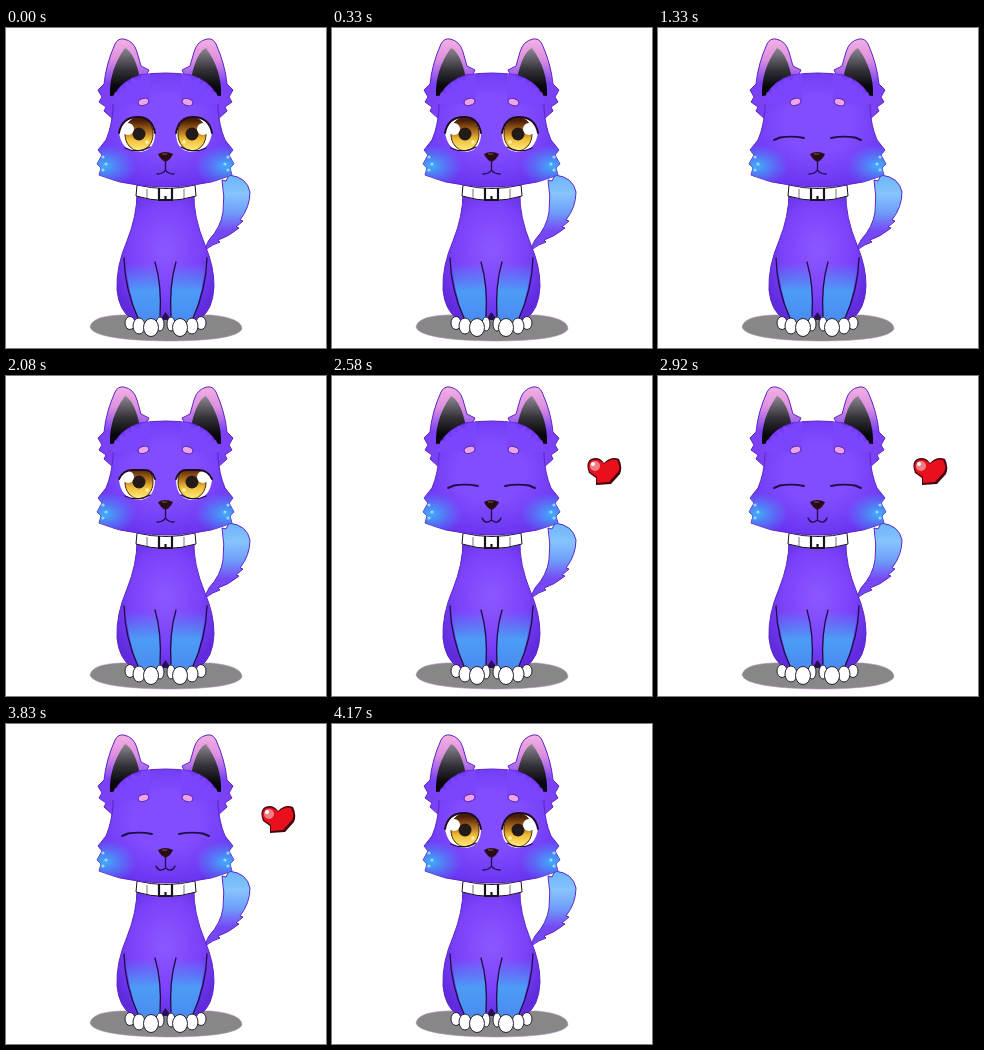
Write an HTML page that moves like this. It is 320x320 px and loops after 4260 ms.

```html
<!DOCTYPE html>
<html lang="en">
<head>
<meta charset="utf-8">
<title>Blinking cat</title>
<style>
html, body { margin: 0; height: 100%; overflow: hidden; background: #fff; }
svg { display: block; width: 100vw; height: 100vh; }
.line { fill: none; stroke: #1f0d48; stroke-width: 1.3; stroke-linecap: round; stroke-linejoin: round; }
.fur { stroke: #5b25c9; stroke-width: 1; stroke-linejoin: round; }
</style>
</head>
<body>
<svg viewBox="0 0 320 320">
  <defs>
    <radialGradient id="head" cx=".5" cy=".45" r=".62">
      <stop offset=".4" stop-color="#824dff"/><stop offset="1" stop-color="#6730ee"/>
    </radialGradient>
    <radialGradient id="body" cx=".5" cy=".45" r=".6">
      <stop offset=".1" stop-color="#8a54ff"/><stop offset=".6" stop-color="#7b42fa"/><stop offset="1" stop-color="#602bdd"/>
    </radialGradient>
    <linearGradient id="leg" x2="0" y2="1">
      <stop offset=".1" stop-color="#4a9cf6" stop-opacity="0"/>
      <stop offset=".55" stop-color="#4c9cf6"/><stop offset="1" stop-color="#4a8cf0"/>
    </linearGradient>
    <radialGradient id="cheek">
      <stop offset=".1" stop-color="#45a2f8"/><stop offset="1" stop-color="#4a90f8" stop-opacity="0"/>
    </radialGradient>
    <linearGradient id="tail" x2="0" y2="1">
      <stop stop-color="#6cb4fa"/><stop offset=".25" stop-color="#86c4fc"/>
      <stop offset=".5" stop-color="#6f9dfa"/><stop offset=".75" stop-color="#7648f4"/>
    </linearGradient>
    <linearGradient id="inner" x2="0" y2="1">
      <stop stop-color="#8d8792"/><stop offset=".45" stop-color="#35333a"/><stop offset=".8" stop-color="#08070a"/>
    </linearGradient>
    <linearGradient id="earFur" x2="0" y2="1">
      <stop stop-color="#f2b0e2"/><stop offset=".25" stop-color="#dd90df"/><stop offset=".55" stop-color="#7a42f4"/>
    </linearGradient>
    <linearGradient id="iris" x2="0" y2="1">
      <stop offset=".1" stop-color="#4b1c08"/><stop offset=".4" stop-color="#a9691b"/>
      <stop offset=".65" stop-color="#efbd35"/><stop offset="1" stop-color="#ffee80"/>
    </linearGradient>
    <path id="headShape" d="M107 80Q105 57 134 47Q160 43 185 47Q214 57 212 80Q213 98 219 112L227 122L223 127L228 136L224 140L226 147Q212 152 205 154Q182 159 160 159Q137 159 114 154Q107 152 93 147L95 140L91 136L96 127L92 122L100 112Q106 98 107 80Z"/>
    <clipPath id="face"><use href="#headShape"/></clipPath>
    <clipPath id="opening"><path id="lidShape"/></clipPath>

    <g id="ear">
      <path class="fur" fill="url(#earFur)" d="M108 92L98 83L100 79L93 74L96 69L92 62L98 56Q100 36 109 16Q112 10 118 11Q128 13 131 24L135 38L143 42L139 50L130 70Z"/>
      <path fill="url(#inner)" d="M104 68Q103 42 119 20Q129 25 134 51L124 66Z"/>
    </g>
    <path id="tuft" fill="#7c45fb" d="M105 76L109 64L114 67L114 59L120 62L119 54L126 57L125 50L133 53L136 47L144 46V76Z"/>
    <g id="eye">
      <g clip-path="url(#opening)">
        <path fill="#fff" d="M110 82H154V126H110Z"/>
        <ellipse cx="133" cy="106" rx="14" ry="17" fill="url(#iris)" stroke="#4a2209"/>
        <circle cx="133" cy="106" r="6.500" fill="#241b18"/>
        <circle cx="122" cy="101" r="6" fill="#fff"/>
        <circle cx="141" cy="114" r="1.800" fill="#fff4b8"/>
      </g>
      <path id="lid" fill="none" stroke="#1c0c20" stroke-width="1.900" stroke-linecap="round"/>
      <path class="line" d="M119 120Q131 126 144 119" stroke-width=".8"/>
    </g>
    <path id="shut" class="line" style="stroke-width:1.900" d="M116 112L122 109.500Q134 107.500 146 110"/>
    <g id="foreleg">
      <path fill="url(#leg)" d="M119 232Q135 224 149 234Q155 258 154 292H132Q122 262 119 232Z"/>
      <path class="line" d="M118 230Q119 262 132 290M149 234Q156 258 154 288"/>
      <g fill="#fff" stroke="#292136">
        <ellipse cx="124" cy="295" rx="5" ry="6.500"/><ellipse cx="154" cy="296" rx="4" ry="7"/>
        <ellipse cx="133" cy="298" rx="6" ry="8"/><ellipse cx="145" cy="299.500" rx="7.500" ry="9"/>
      </g>
    </g>
    <g id="whiskerDots" fill="#8fdaff">
      <circle cx="97" cy="129" r="1.600"/><circle cx="100" cy="136" r="1.600"/><circle cx="97" cy="142" r="1.600"/>
    </g>
  </defs>

  <path fill="#878787" stroke="#b08ab8" stroke-width=".6" d="M84 299Q86 288 115 287H205Q236 290 236 301Q230 313 160 313Q88 312 84 299Z"/>
  <path class="fur" fill="url(#tail)" d="M198 222L203 212Q215 199 217 184Q219 168 216 152L220 153L223 147Q241 149 244 164Q244 179 234 192L237 193L230 199L233 200Q222 209 212 212L214 214Q207 216 199 222Z"/>
  <path class="fur" fill="url(#body)" d="M131 165Q131 188 121 213Q110 238 111 262Q113 283 126 291H193Q207 283 208 258Q208 238 199 217Q187 188 188 165Z"/>
  <path fill="#241150" d="M154 292L159.500 284L165 292Z"/>
  <use href="#foreleg"/><use href="#foreleg" transform="matrix(-1 0 0 1 319 0)"/>

  <g stroke="#17141d" fill="none">
    <path fill="#fff" d="M131 157Q160 164 189 157L190 168Q160 177 130 168Z"/>
    <path stroke="#77727e" d="M141 161V170M178 161V170"/>
    <path stroke-width="2.200" d="M153 160V172H166V160M159.500 172V168"/>
  </g>

  <use href="#ear"/><use href="#ear" transform="matrix(-1 0 0 1 319 0)"/>
  <use href="#headShape" class="fur" fill="url(#head)"/>
  <use href="#tuft"/><use href="#tuft" transform="matrix(-1 0 0 1 319 0)"/>
  <g fill="url(#cheek)" clip-path="url(#face)">
    <ellipse cx="99" cy="138" rx="32" ry="22"/><ellipse cx="220" cy="138" rx="32" ry="22"/>
  </g>
  <use href="#whiskerDots"/><use href="#whiskerDots" transform="matrix(-1 0 0 1 319 0)"/>
  <g fill="#eda4e6" stroke="#5629af">
    <ellipse cx="137.500" cy="74" rx="5.500" ry="3.500" transform="rotate(-15 137 74)"/>
    <ellipse cx="181.500" cy="74" rx="5.500" ry="3.500" transform="rotate(15 181 74)"/>
  </g>
  <g id="openEyes"><use href="#eye"/><use href="#eye" transform="matrix(-1 0 0 1 319 0)"/></g>
  <g id="shutEyes"><use href="#shut"/><use href="#shut" transform="matrix(-1 0 0 1 319 0)"/></g>
  <path fill="#2a0d12" d="M152 126Q159 122 167 126Q165 131 159.500 134Q154 131 152 126Z"/>
  <path fill="none" stroke="#875058" d="M156 126H161"/>
  <path id="mouth" class="line"/>

  <g id="heart">
    <path fill="#430711" d="M264 109V102L257 97Q253 87 259 83Q267 80 272 87Q279 80 287 83Q291 91 288 98L279 108Z"/>
    <path fill="#e90f1d" d="M265 107V101L258 96Q254 88 260 84Q267 82 272 88Q279 82 285 84Q289 91 286 96L277 106Z"/>
    <circle cx="263" cy="90" r="5" fill="#ee8088"/>
    <circle cx="261" cy="88" r="2" fill="#fff"/>
  </g>
</svg>
<script>
const LOOP = 4260, FPS = 12, ROUNDING = 8;
const HAPPY_START = 31, HAPPY_END = 50;
const blinkStarts = [1, 11, 15, 25];
const get = id => document.getElementById(id);
const show = (id, on) => get(id).style.display = on ? "" : "none";

function draw() {
  // Step times are rounded to 10 ms, some of them downwards.
  const step = Math.floor((performance.now() % LOOP + ROUNDING) * FPS / 1000);
  const happy = step >= HAPPY_START && step < HAPPY_END;
  const phase = blinkStarts.map(s => step - s).find(p => p >= 0 && p < 3);
  const shut = happy || phase === 1;
  const half = phase === 0 || phase === 2;
  const top = half ? "M113 103Q117 94 127 94H139Q146 94 149 103" : "M113 105Q116 89 132 89Q146 89 149 105";
  get("lid").setAttribute("d", top);
  get("lidShape").setAttribute("d", top + "Q149 123 133 124Q115 123 113 104Z");
  get("mouth").setAttribute("d", happy
    ? "M159.500 134V143M150 142Q153 149 159.500 144Q166 149 169 142"
    : "M159.500 134V142M151 146Q157 146 159.500 142Q162 146 168 146");
  show("openEyes", !shut);
  show("shutEyes", shut);
  show("heart", happy);
  requestAnimationFrame(draw);
}
draw();
</script>
</body>
</html>
```
